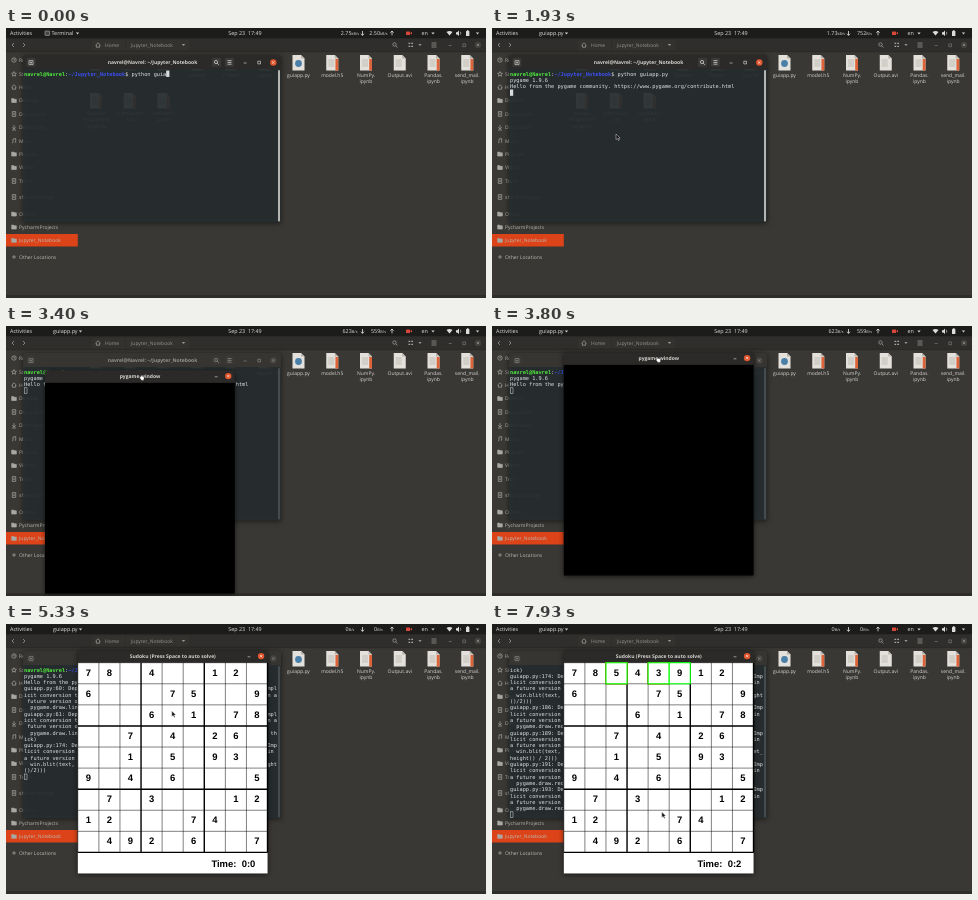
Animation of 480x270 px, one loop 8000 ms. Source, as an HTML page:

```html
<!DOCTYPE html>
<html lang="en">
<head>
<meta charset="utf-8">
<title>Sudoku solver desktop</title>
<style>
  html, body { margin: 0; width: 100%; height: 100%; overflow: hidden; background: #393834; }
  svg { display: block; width: 100vw; height: 100vh; }
  text { font: 5px "Open Sans", "Noto Sans", sans-serif; fill: #d6d4d0; white-space: pre; text-rendering: geometricPrecision; }
  .top { font-size: 5.4px; fill: #e2e2e2; }
  .bold { font-weight: 700; }
  .mid { text-anchor: middle; }
  .dim { fill: #96948e; }
  .place { fill: #bcbab4; }
  .unit { font-size: 3.8px; }
  .mono { font: 5.25px "DejaVu Sans Mono", monospace; fill: #dfe2e2; }
  .user { fill: #4fe83c; font-weight: 700; }
  .path { fill: #3b4ff0; font-weight: 700; }
  .digit { font: 700 9.45px "Liberation Sans", Arial, sans-serif; fill: #000; }
  .line { fill: none; stroke: #a9a7a2; stroke-width: .7; }
  .shadow { filter: drop-shadow(0 1px 2.5px rgba(0, 0, 0, .6)); }
</style>
</head>
<body>
<svg viewBox="0 0 480 270">
  <g id="files"></g>
  <g id="bar"></g>
  <g id="terminal"></g>
  <g id="game"></g>
  <g id="pointer">
    <path id="arrow" d="M0 0V5.6L1.4 4.4L2.4 6.5L3.3 6.1L2.4 4.1H4.1Z" fill="#111" stroke="#e8e8e8" stroke-width=".45"/>
    <path id="hand" transform="scale(.85)" d="M-1.6 1.6Q-1.6.3-.6.4Q0-.6.8.3Q1.8-.1 2 .9Q3 .7 3 1.7V3.4Q2.8 5.2 1 5.2Q-.6 5.2-1.2 3.6L-2.3 2.2Q-2.2 1.3-1.6 1.6Z" fill="#fff" stroke="#222" stroke-width=".4"/>
  </g>
</svg>
<script>
const LOOP = 8000;
const byId = id => document.getElementById(id);

// Markup helpers
const rect = (x, y, w, h, fill, more = '') =>
  `<rect x="${x}" y="${y}" width="${w}" height="${h}" fill="${fill}" ${more}/>`;
const label = (x, y, str, cls = '') => `<text x="${x}" y="${y}" class="${cls}">${str}</text>`;
const stroke = (d, color = '#a9a7a2', width = .7) =>
  `<path class="line" d="${d}" style="stroke:${color};stroke-width:${width}"/>`;
const dot = (x, y, r, fill) => `<circle cx="${x}" cy="${y}" r="${r}" fill="${fill}"/>`;
const caret = (x, y, color = '#cfcdc9') => `<path d="M${x - 1.7} ${y - 1}h3.4l-1.7 2.1z" fill="${color}"/>`;
const cross = (x, y, color) => stroke(`M${x - 1.2} ${y - 1.2}l2.4 2.4m0-2.4l-2.4 2.4`, color, .6);
const closeButton = (x, y, fill = '#e2552c', ink = '#fff') => dot(x, y, 3.2, fill) + cross(x, y, ink);

// Only touches the DOM when the markup changes
const painted = {};
function paint(id, markup) {
  if (painted[id] !== markup) byId(id).innerHTML = painted[id] = markup;
}

// File manager
const ICONS = {
  circle: 'M5.8 0a2.2 2.2 0 1 0 4.4 0a2.2 2.2 0 1 0-4.4 0M8-1.2V0H9',
  star: 'M8-2.4L8.7-.8L10.4-.6L9.1.5L9.5 2.2L8 1.3L6.5 2.2L6.9.5L5.6-.6L7.3-.8Z',
  home: 'M5.5.2L8-2.2L10.5.2M6.4 0V2.2H9.6V0',
  folder: 'M5.7-1.9H7.5L8.2-1.2H10.3V2H5.7Z',
  page: 'M6.3-2.4H9.7V2.4H6.3ZM7.2-.8H8.8M7.2.6H8.8',
  down: 'M8-2.4V1.5M6.2-.2L8 1.6L9.8-.2M6 2.5H10',
  note: 'M7 1.6V-2L9.7-2.4V1.2M6.2 1.7H7M8.9 1.3H9.7',
  plus: 'M6 0H10M8-2V2',
};
const PLACES = [
  [32, 'circle', 'Recent'], [46, 'star', 'Starred'], [59, 'home', 'Home'], [72.5, 'folder', 'Desktop'],
  [86, 'page', 'Documents'], [99.5, 'down', 'Downloads'], [113, 'note', 'Music'], [126, 'folder', 'Pictures'],
  [139.5, 'folder', 'Videos'], [153, 'page', 'Trash'], [169, 'page', 'shared storage'], [186, 'folder', 'Others'],
  [199, 'folder', 'PycharmProjects'], [212.3, 'folder', 'Jupyter_Notebook'], [229, 'plus', 'Other Locations'],
];
const FILES = [
  ['Dataset', 0, 0], ['Images', 1, 0], ['Models', 2, 0], ['Dateset', 3, 0], ['Project', 4, 0], ['day.txt', 5, 0],
  ['guiapp.py', 6, 0], ['model.h5', 7, 0], ['NumPy.|ipynb', 8, 0], ['Output.avi', 9, 0],
  ['Pandas.|ipynb', 10, 0], ['send_mail.|ipynb', 11, 0],
  ['Sudoku|Programmi|ng.ipynb', 0, 1], ['submission|.csv', 1, 1], ['untitled1.|ipynb', 2, 1],
];

function fileIcon([name, col, row]) {
  const x = 90 + col * 33.75, y = 27 + row * 38;
  let out = `<path d="M${x - 6} ${y}h8.5l3.5 3.5v12h-12z" fill="#e4e1dc"/>` +
    `<path d="M${x + 2.5} ${y}v3.5h3.5z" fill="#b9b4ac"/>`;
  if (name.endsWith('.py')) out += dot(x, y + 8.5, 3.4, '#4a7fa8');
  else {
    out += stroke([5, 7, 9, 11].map(k => `M${x - 4} ${y + k}h6`).join(''), '#a8a49d', .6);
    if (!name.endsWith('.avi')) out += rect(x + 3.2, y + 4, 2.8, 11.5, '#dd6339');
  }
  return out + name.split('|').map((s, i) => label(x, y + 22.2 + i * 6.2, s, 'mid')).join('');
}

function placeRow([y, icon, name]) {
  const solid = icon === 'folder' ? `<path d="${ICONS.folder}" fill="#aaa8a2"/>` : '';
  return `<g transform="translate(0 ${y})">${solid}${stroke(ICONS[icon], '#aaa8a2')}${label(13, 1.8, name, 'place')}</g>`;
}

function drawFiles() {
  return rect(0, 0, 480, 270, '#393834') + rect(0, 206, 71.8, 12.5, '#dc4318') +
    PLACES.map(placeRow).join('') + rect(0, 267, 480, 3, '#2e2d2a') +
    rect(0, 10, 480, 14, '#2f2e2c') + rect(0, 23.6, 480, .5, '#242321') +
    rect(86, 12, 97, 10.5, '#33322f', 'rx="1.5"') +
    stroke('M8 15l-2 2l2 2M17 15l2 2l-2 2') +
    `<g transform="translate(84 17)">${stroke(ICONS.home)}</g>` +
    label(99, 18.9, 'Home', 'dim') + stroke('M119.5 12.5v9.5', '#282725', .5) +
    label(125, 18.9, 'Jupyter_Notebook', 'dim') + caret(177.5, 17, '#96948e') +
    `<circle class="line" cx="388.5" cy="16.5" r="1.7"/>` + stroke('M389.8 17.8l1.7 1.7') +
    stroke('M402.5 15.3h1.7M405.3 15.3h1.7M402.5 18.3h1.7M405.3 18.3h1.7', '#a9a7a2', 1.3) + caret(414, 17, '#96948e') +
    stroke('M425.5 15h5M425.5 17h5M425.5 19h5') + stroke('M442.7 17.5h3M456.8 15.9h2.8v2.8h-2.8z', '#85837e', .6) +
    closeButton(472, 17, '#43413e', '#a9a7a2') + FILES.map(fileIcon).join('');
}

// Top bar
const SPEEDS = [
  [0, '2.75', '2.50'], [930, '2.10', '980'], [1930, '1.73', '752'], [2930, '623', '559'],
  [3930, '0', '0'], [5930, '559', '0'], [6930, '815', '0'], [7930, '0', '0'],
];
const speed = (x, n) => label(x, 7.3,
  `${n}<tspan class="unit">${n.includes('.') ? 'kB/s' : 'B/s'}</tspan>`, 'top mid');

function drawBar(t) {
  const launched = t >= 1930;
  const [, down, up] = SPEEDS.filter(s => s[0] <= t).pop();
  const app = launched ? label(47, 7.3, 'guiapp.py', 'top') + caret(74.5, 5.4)
    : rect(39, 3, 4.6, 4.4, '#444', 'rx=".6" stroke="#ccc" stroke-width=".5"') +
      label(45.5, 7.3, 'Terminal', 'top') + caret(71.5, 5.4);
  return rect(0, 0, 480, 10.3, '#1c1c1b') + label(4, 7.3, 'Activities', 'top') + app +
    label(239, 7.3, 'Sep 23  17:49', 'top mid') + speed(344, down) + speed(372.5, up) +
    stroke('M356.5 3v4.3M354.9 5.7l1.6 1.7l1.6-1.7M386 7.3V3M384.4 4.7l1.6-1.7l1.6 1.7', '#e6e6e6', .8) +
    rect(400, 3.4, 4, 3.6, '#d9473b', 'rx=".6"') + '<path d="M404 5.2l2-1.4v2.8z" fill="#d9473b"/>' +
    label(415.5, 7.3, 'en', 'top') + caret(427, 5.4) +
    '<path d="M440.5 4q3-2.2 6 0l-3 3.6z" fill="#ddd"/><path d="M450 4.2h1.3l1.7-1.6v5.4l-1.7-1.6h-1.3z" fill="#ddd"/>' +
    stroke('M454.3 3.8q1 1.4 0 2.9', '#ddd', .6) +
    rect(460, 3, 3.4, 5, '#ddd', 'rx=".5"') + rect(460.9, 2.2, 1.6, 1, '#ddd') + caret(471.5, 5.4);
}

// Terminal
const COLS = 80, ROWS = 24, CHAR = 3.16, PITCH = 6.3;
const PROMPT = [['user', 'navrel@Navrel'], ['', ':'], ['path', '~/Jupyter_Notebook'], ['', '$ ']];
const COMMAND = 'python guiapp.py';
const KEY_TIMES = [200, 330, 530, 800, 1000];
const warning = (line, code) => [
  `guiapp.py:${line}: DeprecationWarning: an integer is required (got type float).  ` +
  'Implicit conversion to integers using __int__ is deprecated, and may be removed in a future version of Python.',
  '  ' + code];
const OUTPUT = [
  [1930, ['pygame 1.9.6', 'Hello from the pygame community. https://www.pygame.org/contribute.html']],
  [5330, warning(60, 'pygame.draw.line(self.win, (0,0,0), (0, i*gap), (self.width, i*gap), thick)')],
  [5330, warning(61, 'pygame.draw.line(self.win, (0, 0, 0), (i * gap, 0), (i * gap, self.height), thick)')],
  [5330, warning(174, 'win.blit(text, (x + (gap/2 - text.get_width()/2), y + (gap/2 - text.get_height()/2)))')],
  [7330, warning(186, 'pygame.draw.rect(win, (255, 255, 255), (x, y, gap, gap), 0)')],
  [7330, warning(189, 'win.blit(text, (x + (gap / 2 - text.get_width() / 2), y + (gap / 2 - text.get_height() / 2)))')],
  [7330, warning(191, 'pygame.draw.rect(win, (0, 255, 0), (x, y, gap, gap), 3)')],
  [7530, warning(193, 'pygame.draw.rect(win, (255, 0, 0), (x, y, gap, gap), 3)')],
];
const wrap = str => str.match(new RegExp(`.{1,${COLS}}`, 'g'));

function drawTerminal(t) {
  const focused = t < 2400;
  const typed = COMMAND.slice(0, COMMAND.length - KEY_TIMES.filter(k => k > t).length);
  const prompt = PROMPT.map(([cls, s]) => `<tspan class="${cls}">${s}</tspan>`).join('') + typed;
  const promptLength = PROMPT.reduce((n, p) => n + p[1].length, 0);
  let rows = [prompt], cursorCol = promptLength + typed.length;
  if (t >= 1470) {
    const printed = OUTPUT.filter(o => o[0] <= t).flatMap(o => o[1]).flatMap(wrap);
    rows = [prompt, ...printed, ''].slice(-ROWS);
    cursorCol = 0;
  }
  const cursorBox = [18 + cursorCol * CHAR, 42.6 + (rows.length - 1) * PITCH];
  const cursor = focused ? rect(...cursorBox, 3.2, 6.3, '#d8dcdc')
    : rect(cursorBox[0] + .3, cursorBox[1] + .3, 2.7, 5.7, 'none', 'stroke="#d8dcdc" stroke-width=".5"');
  const ink = focused ? '#e8e6e3' : '#96948e';
  const header = focused ? '#2b2a28' : '#363532';
  const button = x => rect(x - 4.5, 29.7, 9, 9, focused ? '#3a3937' : '#3a3936', 'rx="1.3"');
  return '<g class="shadow">' + rect(17, 41, 258, 153.3, 'rgba(41,48,50,.87)') +
    `<path d="M17 41V29.5q0-2.5 2.5-2.5h253q2.5 0 2.5 2.5V41z" fill="${header}"/></g>` +
    button(25) + button(210.5) + button(223.5) +
    stroke('M23 32.6h4v4h-4zM25 33.5v2.2M24 34.6h2', ink, .6) +
    label(146.5, 36.4, 'navrel@Navrel: ~/Jupyter_Notebook', 'bold mid' + (focused ? '' : ' dim')) +
    `<circle class="line" cx="210" cy="34" r="1.6" style="stroke:${ink}"/>` +
    stroke('M211.2 35.2l1.6 1.6M221.5 32.6h4M221.5 34.4h4M221.5 36.2h4', ink) +
    stroke('M237.7 35h2.8M251.8 33.2h2.7v2.7h-2.7z', ink, .6) +
    (focused ? closeButton(267.3, 34.5) : closeButton(267.3, 34.5, '#474542', ink)) +
    rect(272, 42, 2, 151.5, focused ? '#b5b5b1' : '#454c4d', 'rx="1"') + cursor +
    rows.map((s, i) => label(18, (47.5 + i * PITCH).toFixed(1), s, 'mono')).join('');
}

// Sudoku
const CELL = 21.08, HEAD = 12.5, WIDTH = 189.8, HEIGHT = 210.8;
const BOARD = ['780400120', '600075009', '000601078', '007040260', '001050930', '904060005',
  '070300012', '120007400', '049206007'].map(r => [...r].map(Number));

// Backtracking solver that records every visible move as [row, col, value]
function recordMoves(limit) {
  const grid = BOARD.map(r => [...r]), moves = [];
  const fits = (r, c, n) => grid.every((row, i) => grid[r][i] !== n && row[c] !== n &&
    grid[r - r % 3 + Math.floor(i / 3)][c - c % 3 + i % 3] !== n);
  const place = (r, c, n) => { grid[r][c] = n; moves.push([r, c, n]); };
  (function solve() {
    const r = grid.findIndex(row => row.includes(0));
    if (r < 0 || moves.length >= limit) return true;
    const c = grid[r].indexOf(0);
    for (let n = 1; n <= 9; n++) {
      if (!fits(r, c, n)) continue;
      place(r, c, n);
      if (solve()) return true;
      place(r, c, 0);
    }
    return false;
  })();
  return moves;
}
const MOVES = recordMoves(7);

const digit = (r, c, n) => label((c + .5) * CELL, (r * CELL + 13.1).toFixed(2), n, 'digit mid');

function drawBoard(t) {
  let out = rect(0, 0, WIDTH, HEIGHT, '#fff');
  for (let i = 0; i <= 9; i++) {
    const p = i * CELL, w = i && i % 3 === 0 ? 1.4 : .5;
    out += stroke(`M0 ${p}H${WIDTH}M${p} 0V${9 * CELL}`, '#000', w);
  }
  BOARD.forEach((row, r) => row.forEach((n, c) => { if (n) out += digit(r, c, n); }));
  const shown = Math.max(0, Math.floor((t - 7330) / 100) + 1);
  for (const [r, c, n] of MOVES.slice(0, shown))
    out += rect(c * CELL, r * CELL, CELL, CELL, '#fff', `stroke="${n ? '#0f0' : '#f00'}" stroke-width="1.1"`) + digit(r, c, n);
  const seconds = t < 5800 ? 0 : t < 6800 ? 1 : 2;
  return out + label(133.6, 204.4, `Time:  0:${seconds}`, 'digit');
}

function drawGame(t) {
  const playing = t >= 5330;
  return `<g class="shadow">${rect(0, HEAD, WIDTH, HEIGHT, '#000')}` +
    `<path d="M0 ${HEAD}V2.5Q0 0 2.5 0H187.3Q189.8 0 189.8 2.5V${HEAD}z" fill="#2b2a28"/></g>` +
    label(95, 7.9, playing ? 'Sudoku (Press Space to auto solve)' : 'pygame window', 'bold mid') +
    stroke('M169.8 6.6h2.8', '#e0deda', .6) + closeButton(183.3, 5.9) +
    (playing ? `<g transform="translate(0 ${HEAD})">${drawBoard(t)}</g>` : '');
}

// Motion: stops are [time, x, y]
const GAME_PATH = [[3400, 39, 44.2], [3750, 71.8, 26.2]];
const POINTER_PATH = [
  [1930, 124, 106], [2400, 124, 106], [2800, 126, 89], [3130, 135.5, 50], [3400, 135.5, 50], [3750, 166, 32.2],
  [4270, 166, 32.2], [4670, 165.8, 87], [5730, 165.8, 87], [6070, 157, 140], [6470, 169.8, 188],
];
function along(stops, t) {
  const next = stops.findIndex(s => s[0] > t);
  if (next < 0) return stops.at(-1).slice(1);
  if (next === 0) return stops[0].slice(1);
  const [t0, x0, y0] = stops[next - 1], [t1, x1, y1] = stops[next];
  const k = (t - t0) / (t1 - t0), e = k * k * (3 - 2 * k);
  return [x0 + (x1 - x0) * e, y0 + (y1 - y0) * e];
}
const show = (id, on) => byId(id).setAttribute('visibility', on ? 'inherit' : 'hidden');

function render(t) {
  paint('bar', drawBar(t));
  paint('terminal', drawTerminal(t));
  paint('game', drawGame(t));

  const open = Math.min(1, Math.max(0, (t - 2400) / 150));
  const [gx, gy] = along(GAME_PATH, t);
  const scale = .85 + .15 * open, game = byId('game');
  game.setAttribute('transform',
    `translate(${gx + 95 * (1 - scale)} ${gy + 112 * (1 - scale)}) scale(${scale})`);
  game.setAttribute('opacity', open);

  const dragging = t >= 3330 && t < 4270;
  byId('pointer').setAttribute('transform', `translate(${along(POINTER_PATH, t)})`);
  byId('pointer').setAttribute('visibility', t >= 1930 ? 'visible' : 'hidden');
  show('arrow', !dragging);
  show('hand', dragging);
}

paint('files', drawFiles());
const start = performance.now();
function tick() {
  render((performance.now() - start) % LOOP);
  requestAnimationFrame(tick);
}
tick();
</script>
</body>
</html>
```
